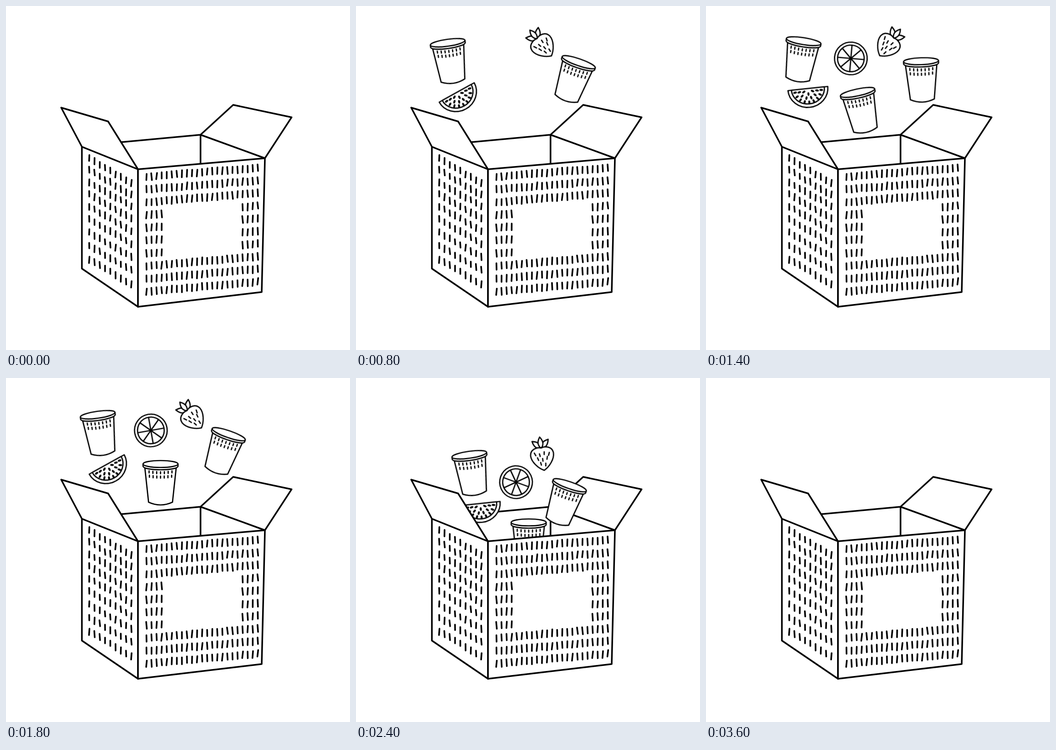
Animation, 748 px wide and 748 px high, one loop 3800 ms. Source, as an HTML page:

```html
<!DOCTYPE html>
<html lang="en">
<head>
<meta charset="utf-8">
<title>Fruit box</title>
<style>
  html, body { margin: 0; height: 100%; overflow: hidden; background: #fff; }
  svg { display: block; width: 100vw; height: 100vh; }
  path, circle, ellipse { stroke: #000; stroke-linecap: round; stroke-linejoin: round; }
  #items { fill: #fff; stroke-width: 2.7; }
  #items path, #items circle, #items ellipse { stroke-width: 2.7; }
  #items .seed { fill: #000; stroke-width: .5; }
  .box { fill: #fff; stroke-width: 3.5; }
  .marks { fill: none; stroke-width: 3.6; }
</style>
</head>
<body>
<svg viewBox="0 0 748 748">
  <path class="box" d="M251 296L423 280V343M423 280L494 215L621 242L563 331Z"/>
  <g id="items"></g>
  <path class="box" d="M165 306L287 355V654L165 571Z"/>
  <path class="box" d="M287 355L563 331L556 622L287 654Z"/>
  <path class="box" d="M120 221L222 251L287 355L165 306Z"/>
  <path class="marks" id="marks"/>
</svg>
<script>
const STEP = 200, STEPS = 19, FALL_START = 10;
const range = n => [...Array(n).keys()];
const repeat = (n, draw) => range(n).map(draw).join('');

let seed = 11;
const random = () => (seed = (seed * 16807) % 2147483647) / 2147483647;
const jitter = size => (random() - .5) * size;

function dash(x, y, length, lean = 0) {
  const dx = lean / 2, dy = length / 2;
  return `M${x - dx} ${y - dy}L${x + dx} ${y + dy}`;
}

function sideMarks() {
  return repeat(9, row => repeat(9, col => {
    const y = 332 + 24.5 * row + .36 * row * row + 6.7 * col;
    return dash(181 + 11.45 * col, y + jitter(3), 13 + jitter(3), jitter(3));
  }));
}

function frontMarks() {
  return repeat(10, row => repeat(23, col => {
    const blank = row > 2 && row < 7 && col > 3 && col < 19;
    if (blank) return '';
    const left = 371 + 27.8 * row, right = 352 + 27.5 * row;
    const y = left + (right - left) * col / 22;
    return dash(305.5 + 11 * col, y + jitter(2), 14.5 + jitter(2), jitter(3.5));
  }));
}

function cup() {
  const marks = repeat(7, i => {
    const x = (i - 3) * 8.3, dip = 2 - x * x / 320;
    return dash(x, -24 + dip, 4.5) + dash(x * .97, -14.5 + dip, 4.5);
  });
  return `<path d="M-34 -32L-26 42Q0 54 26 42L34 -32Z"/>
    <path d="M-38 -41V-36C-36 -26 36 -26 38 -36V-41Z"/>
    <ellipse cy="-41" rx="38" ry="7.5"/>
    <path d="${marks}"/>`;
}

function melon() {
  const seeds = repeat(3, ring => {
    const count = 9 - 3 * ring;
    return repeat(count, i => `<ellipse class="seed" cx="${29 - 9 * ring}" rx="3.8" ry="2"
      transform="translate(0 1) rotate(${180 * (i + .5) / count})"/>`);
  });
  return `<path d="M-43.5 0A43.5 41 0 0 0 43.5 0Z"/>
    <path d="M-36 0A36 33.5 0 0 0 36 0Z"/>${seeds}`;
}

function strawberry() {
  const leaf = angle => `<path transform="translate(0 -20) rotate(${angle})"
    d="M0 0C-7 -8 -7 -15 0 -25C7 -15 7 -8 0 0Z"/>`;
  const marks = repeat(3, row => repeat(4 - row, i => {
    const x = (i - (3 - row) / 2) * 10;
    return dash(x, -9 + 11 * row + (i % 2) * 3, 6, -x / 6);
  }));
  return `${leaf(-45)}${leaf(45)}${leaf(0)}
    <path d="M0 28C-12 22 -26 6 -25 -8C-24 -20 -10 -25 0 -21C10 -25 24 -20 25 -8C26 6 12 22 0 28Z"/>
    <path d="${marks}"/>`;
}

function orange() {
  const spokes = repeat(8, i => `<path d="M0 0V-28" transform="rotate(${i * 45})"/>`);
  return `<circle r="35.5"/><circle r="29"/>${spokes}`;
}

// Poses are [x, y, angle]: three to wobble between, then key points of the fall, two steps apart.
const items = [
  { draw: cup, start: 1,
    wobble: [[471, 161, 19], [469, 161, -2], [468, 161, -10]],
    fall: [[451, 202.5, -2], [451.5, 272, 19], [449, 346, 19]] },
  { draw: melon, start: 2,
    wobble: [[219, 188, -29], [221.5, 179.5, -6], [209, 201.5, 23]],
    fall: [[246, 216.5, 23], [270, 273, -6], [302, 364, -29]] },
  { draw: cup, start: 3,
    wobble: [[205, 120.5, -8], [206, 117, 9], [206, 118, 0]],
    fall: [[253.5, 139.5, 9], [252, 207.5, -8], [279, 302, -8]] },
  { draw: strawberry, start: 4,
    wobble: [[407, 87, -40], [395, 86, 38], [399, 87, -8]],
    fall: [[396, 118, -8], [405.5, 173, -8], [400, 251, -8]] },
  { draw: cup, start: 5,
    wobble: [[336, 228, 0], [338, 228, -12], [337, 226, 8]],
    fall: [[351.5, 266, -12], [375.5, 355, 0], [395, 470, 0]] },
  { draw: orange, start: 6,
    wobble: [[315, 114, -10], [315, 114, 5], [315, 114, 20]],
    fall: [[331.5, 153, 8], [348, 226.5, 20], [361.5, 306, 8]] },
];

// The wobble runs slightly faster than the steps; the fall keeps its last speed.
function poseAt({ wobble, fall }, n) {
  if (n < FALL_START) return wobble[Math.max(0, Math.floor(1.125 * n - .7)) % 3];
  const time = (n - FALL_START) / 2;
  const leg = Math.min(1, Math.floor(time));
  return fall[leg].map((from, i) => from + (fall[leg + 1][i] - from) * (time - leg));
}

function addItem(item) {
  const g = document.createElementNS('http://www.w3.org/2000/svg', 'g');
  g.innerHTML = item.draw();
  document.getElementById('items').append(g);
  const frames = range(STEPS + 1).map(i => {
    const n = Math.min(i, STEPS - 1);
    const [x, y, angle] = poseAt(item, n);
    return {
      offset: i / STEPS,
      easing: 'step-end',
      opacity: n < item.start || n === STEPS - 1 ? 0 : 1,
      transform: `translate(${x}px, ${y}px) rotate(${angle}deg)`,
    };
  });
  g.animate(frames, { duration: STEP * STEPS, iterations: Infinity });
}

document.getElementById('marks').setAttribute('d', sideMarks() + frontMarks());
items.forEach(addItem);
</script>
</body>
</html>
```
